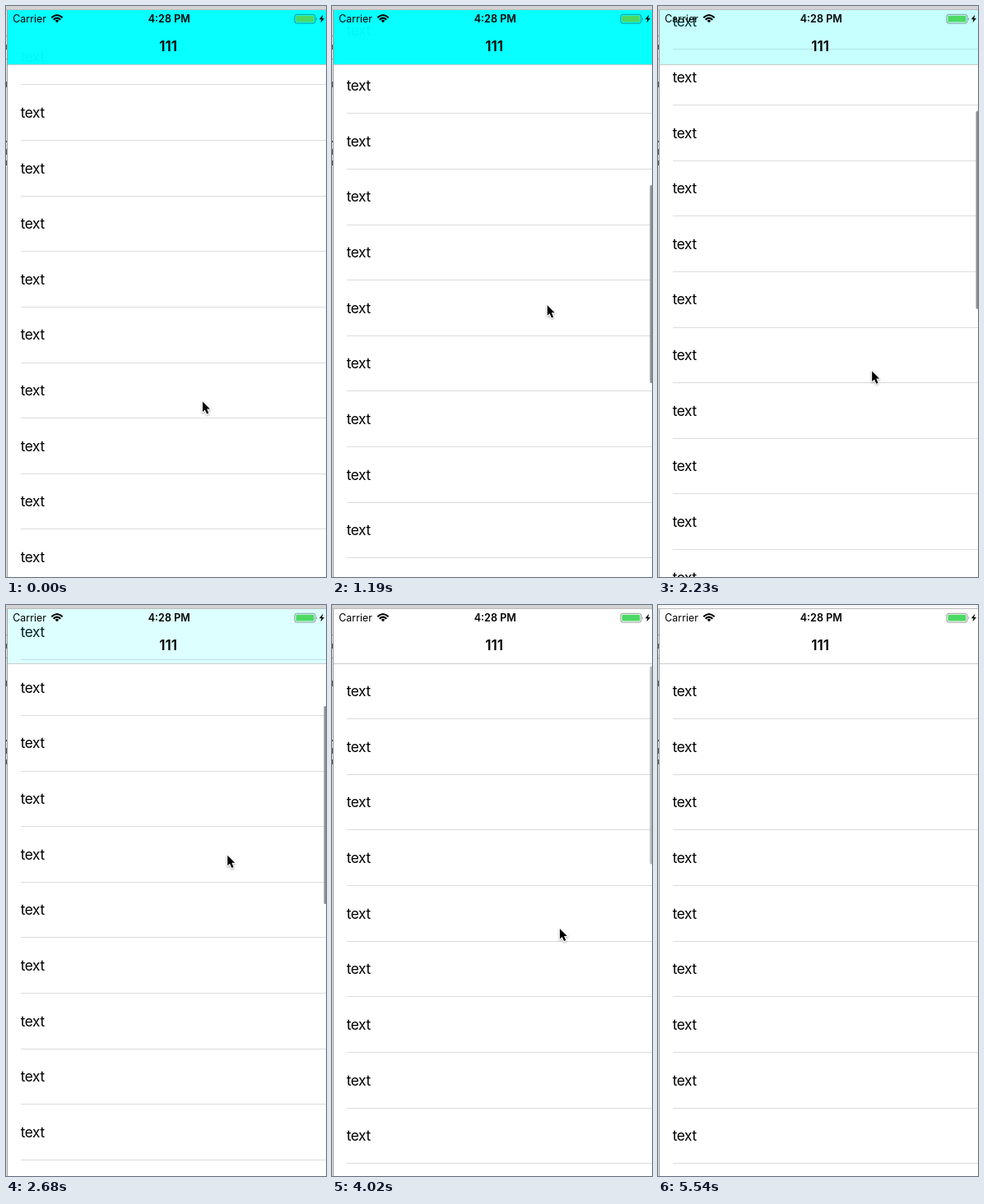
These frames come from a looping animation (389x695 px, 5640 ms). An HTML page:

```html
<!DOCTYPE html>
<html lang="en">
<head>
<meta charset="utf-8">
<title>Fading navigation bar</title>
<style>
  html, body { margin: 0; width: 100%; height: 100%; overflow: hidden; background: #fff; }
  svg { display: block; width: 389px; height: 695px; font-family: Inter, Roboto, sans-serif; }
  .row { font-size: 17.4px; letter-spacing: -.5px; }
  .line { fill: #dcdcdc; shape-rendering: crispEdges; }
</style>
</head>
<body>
<svg id="stage" viewBox="0 0 389 695">
  <defs>
    <clipPath id="screen"><rect x="2" y="5" width="387" height="690"/></clipPath>
    <filter id="shadow" x="-50%" y="-50%" width="200%" height="200%">
      <feDropShadow dx="0" dy="1" stdDeviation=".9" flood-opacity=".4"/>
    </filter>
  </defs>

  <!-- Desktop behind the phone window -->
  <rect width="389" height="695" fill="#e9e9e9"/>
  <path d="M0 36.5h1M0 64.5h1" stroke="#999"/>
  <path d="M.5 47v6M.5 92v7M.5 164v2M.5 174v7M.5 188v6" stroke="#555"/>
  <rect x="1" y="4" width="1" height="691" fill="#9b9b9b"/>
  <rect id="topStrip" width="389" height="4"/>
  <rect y="4" width="389" height="1" fill="#bcbcbc"/>

  <g clip-path="url(#screen)">
    <rect x="2" y="5" width="387" height="690" fill="#fff"/>
    <g id="rows"></g>
    <rect id="bar" x="2" y="5" width="387" height="66" fill="#0ff"/>
    <rect x="2" y="71" width="387" height="1" fill="#c9cccc"/>
    <rect id="scroller" x="386.5" width="3" height="241" rx="1.5" fill="#909090"/>
  </g>

  <!-- Status bar and title -->
  <text x="8.3" y="20.3" font-size="12.4">Carrier</text>
  <g fill="none" stroke="#000" stroke-width="2.1">
    <path d="M55.3 14.3Q62 7.7 68.7 14.3M57.7 16.7Q62 12.5 66.3 16.7"/>
    <path d="M59.7 17.9Q62 15.7 64.3 17.9L62 20.3Z" fill="#000" stroke="none"/>
  </g>
  <text x="198.3" y="20.3" font-size="12.6" font-weight="600" text-anchor="middle">4:28 PM</text>
  <rect x="350.9" y="10.3" width="25" height="10.8" rx="2.6" fill="none" stroke="#000" stroke-opacity=".4"/>
  <rect x="352.4" y="11.8" width="22" height="7.8" rx="1.2" fill="#4cd964"/>
  <path d="M377 13.7Q378.7 15.7 377 17.7Z" fill-opacity=".5"/>
  <path d="M385.4 10.6L380.8 16.2H383.5L382.4 20.6L387 14.9H384.2Z"/>
  <text x="197.2" y="55.2" font-size="17.4" font-weight="600" text-anchor="middle">111</text>

  <g id="cursor" filter="url(#shadow)">
    <path d="M1 1.5V14L3.8 11.4L6.2 16.6L8.4 15.6L6.1 10.5H10Z"
      stroke="#fff" stroke-width="2" paint-order="stroke" stroke-linejoin="round"/>
  </g>
</svg>
<script>
const LOOP = 5640, STEP = 148.5, ROW = 67.65, ROW_COUNT = 28;
const SCROLL_START = 448.78;

// Where the pointer rests: arrival time, x, y
const stops = [
  [0, 238, 480], [300, 238, 443], [450, 238, 443], [594, 263, 310],
  [930, 263, 310], [1750, 253.5, 535], [1950, 253.5, 535], [2600, 268, 300],
  [3200, 275, 382], [3900, 275, 382], [4450, 284, 484], [5040, 20, 710]
];

const $ = id => document.getElementById(id);
const set = (id, attrs) => {
  for (const name in attrs) $(id).setAttribute(name, attrs[name]);
};
const clamp = v => Math.min(1, Math.max(0, v));
const smooth = u => u * u * (3 - 2 * u);

// Progress of a flick: a soft start, then a long exponential coast
function flick(t, start, tau) {
  const x = Math.max(0, (t - start) / tau);
  return 1 - (1 + x) * Math.exp(-x);
}

const scrollAt = t =>
  Math.max(0, SCROLL_START - 313.5 * flick(t, 1040, 260.5) - 150 * flick(t, 2713, 200));

function pointerAt(t) {
  const i = stops.findLastIndex(stop => stop[0] <= t);
  const [t0, x0, y0] = stops[i];
  const [t1, x1, y1] = stops[i + 1] ?? [LOOP, x0, y0];
  const k = smooth((t - t0) / (t1 - t0));
  return [x0 + (x1 - x0) * k, y0 + (y1 - y0) * k];
}

$('rows').innerHTML = Array.from({ length: ROW_COUNT }, (_, i) => {
  const y = i * ROW;
  return `<text class="row" x="17.8" y="${y + 111.1}">text</text>` +
    `<rect class="line" x="18" y="${y + 138.15}" width="371" height="1"/>`;
}).join('');

function draw(time) {
  const t = Math.floor(time / STEP) * STEP;
  const offset = scrollAt(t);
  const [x, y] = pointerAt(t);
  const scrollerOpacity = t < 1039 ? 0 : clamp((4120 - t) / 170);
  set('rows', { transform: `translate(0 ${-offset})` });
  set('bar', { opacity: .97 * clamp((offset - 119) / 152) });
  set('scroller', { y: 74.6 + offset / 2.885, opacity: scrollerOpacity });
  set('cursor', { transform: `translate(${x} ${y})` });
  set('topStrip', { fill: time >= 5540 ? '#f6f6f6' : '#d3d3d3' });
}

let start;
function tick(now) {
  start ??= now;
  draw((now - start) % LOOP);
  requestAnimationFrame(tick);
}
draw(0);
requestAnimationFrame(tick);
</script>
</body>
</html>
```
